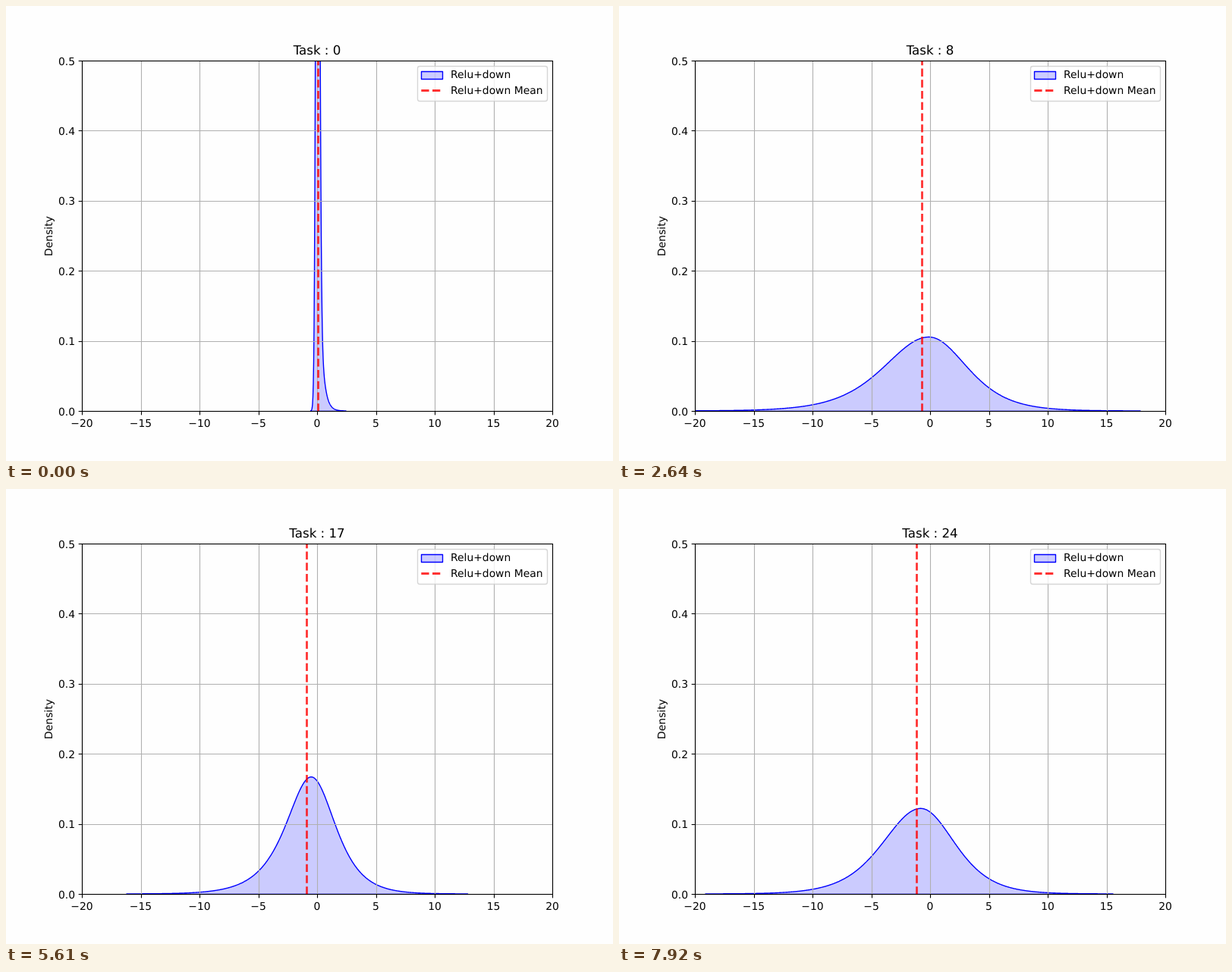
Recreate the animation shown at these times as an HTML page. Size 800 by 600 pixels, loop 8 s.

```html
<!DOCTYPE html>
<html lang="en">
<head>
<meta charset="utf-8">
<title>Density by task</title>
<style>
  html, body { margin: 0; width: 100%; height: 100%; overflow: hidden; background: #fefefe; }
  svg { display: block; width: 800px; height: 600px; }
  text { font: 13.89px "DejaVu Sans", sans-serif; text-rendering: geometricPrecision; }
  #title { font-size: 16.67px; }
  .mid { text-anchor: middle; }
  .end { text-anchor: end; }
  .grid { stroke: #b0b0b0; stroke-width: 1.11; }
  .axis { stroke: #000; stroke-width: 1.11; fill: none; }
  .area { fill: rgba(0, 0, 255, .2); stroke: #00f; stroke-width: 1.39; stroke-linejoin: round; }
  .mean { stroke: #f00; stroke-opacity: .8; stroke-width: 2.78; stroke-dasharray: 10.28 4.44; }
</style>
</head>
<body>
<svg viewBox="0 0 800 600">
  <clipPath id="plot"><rect x="100" y="72" width="620" height="462.5"/></clipPath>
  <g clip-path="url(#plot)"><path id="curve" class="area"/></g>
  <g id="grid"></g>
  <path id="mean" class="mean"/>
  <g id="axes"><rect class="axis" x="100.5" y="72.5" width="620" height="462"/></g>
  <text id="title" class="mid" x="410" y="64"></text>
  <text class="mid" transform="translate(61 303.5) rotate(-90)">Density</text>
  <rect x="542.5" y="79.5" width="171" height="46" rx="2.8" fill="#fff" fill-opacity=".8"
        stroke="#ccc" stroke-opacity=".8" stroke-width="1.39"/>
  <rect class="area" x="547.5" y="86.5" width="28" height="10"/>
  <path class="mean" d="M547.3 111.5H575.1"/>
  <text x="586" y="95">Relu+down</text>
  <text x="586" y="116">Relu+down Mean</text>
</svg>
<script>
const STEP = 330, LOOP = 8000, LAST_TASK = 24, GROWTH_END = 8;
const BASE = 534, LEFT = 100, RIGHT = 720, CENTER = 410, X_UNIT = 15.5, Y_UNIT = 924;
const $ = id => document.getElementById(id);
const toX = value => CENTER + value * X_UNIT;
const toY = density => BASE - density * Y_UNIT;

// Bell with its own half-width and tail on each side; a small tail number is a heavy tail
function bell(peak, height, left, right, leftTail = 2, rightTail = leftTail) {
  return x => {
    const [half, tail] = x < peak ? [left, leftTail] : [right, rightTail];
    const u = (x - peak) / half;
    return height / Math.cosh(Math.acosh(2 ** (1 / tail)) * u) ** tail;
  };
}

const key = (task, mean, ...bells) =>
  ({ task, mean, density: x => bells.reduce((sum, f) => sum + f(x), 0) });

const KEYS = [
  key(0, .08, bell(.03, 1.3, .154, .181, 30), bell(.03, .168, .06, .394, 1)),
  key(3, .35, bell(.1, .452, .84, 1.115, 8, 2.3), bell(.05, -.062, .2, .2, 30)),
  key(8, -.7, bell(-.1, .1055, 4.5, 3.8, 1.8, 2)),
  key(13, -1.74, bell(-1.3, .111, 3.95, 4, 1, 4)),
  key(17, -.9, bell(-.5, .167, 2.55, 2.4, 1, 1.4)),
  key(20, -1.1, bell(-.35, .105, 4.65, 3.75, 1.4, 1.5)),
  key(24, -1.15, bell(-.8, .122, 3.8, 3.4))
];

// While growing, the next shape widens at constant area; later shapes cross-fade
function scene(task) {
  const next = Math.max(1, KEYS.findIndex(k => k.task >= task));
  const a = KEYS[next - 1], b = KEYS[next];
  const mix = (task - a.task) / (b.task - a.task);
  const blend = (p, q) => p + (q - p) * mix;
  const growing = mix > 0 && b.task <= GROWTH_END;
  const width = mix ** .38;
  const density = x => growing ? b.density(x / width) / width : blend(a.density(x), b.density(x));

  const outline = [];
  for (let px = LEFT; px <= RIGHT; px += .5) {
    const d = density((px - CENTER) / X_UNIT);
    if (d > 1e-4) outline.push([px, toY(d).toFixed(2)]);
  }
  const start = outline[0][0], end = outline[outline.length - 1][0], floor = BASE + .5;
  return {
    curve: `M${start} ${floor}L${outline.join("L")}L${end} ${floor}Z`,
    mean: `M${Math.round(toX(blend(a.mean, b.mean))) + .5} ${floor}V72`
  };
}

function buildAxes() {
  let grid = "", axes = "";
  const line = (cls, d) => `<path class="${cls}" d="${d}"/>`;
  for (let value = -20; value <= 20; value += 5) {
    const at = toX(value), x = Math.round(at) + .5;
    grid += line("grid", `M${x} 72V534`);
    axes += line("axis", `M${x} 534.5v4.86`)
      + `<text class="mid" x="${at}" y="555">${String(value).replace("-", "\u2212")}</text>`;
  }
  for (let i = 0; i <= 5; i++) {
    const at = toY(i / 10), y = Math.round(at) + .5;
    grid += line("grid", `M100 ${y}H720`);
    axes += line("axis", `M100.5 ${y}h-4.86`)
      + `<text class="end" x="91" y="${at + 5.5}">${(i / 10).toFixed(1)}</text>`;
  }
  $("grid").innerHTML = grid;
  $("axes").innerHTML += axes;
}

const scenes = Array.from({ length: LAST_TASK + 1 }, (_, task) => scene(task));
let shown = -1;

function draw() {
  const task = Math.min(LAST_TASK, Math.floor(performance.now() % LOOP / STEP));
  if (task !== shown) {
    shown = task;
    $("curve").setAttribute("d", scenes[task].curve);
    $("mean").setAttribute("d", scenes[task].mean);
    $("title").textContent = `Task : ${task}`;
  }
  requestAnimationFrame(draw);
}

buildAxes();
draw();
</script>
</body>
</html>
```
